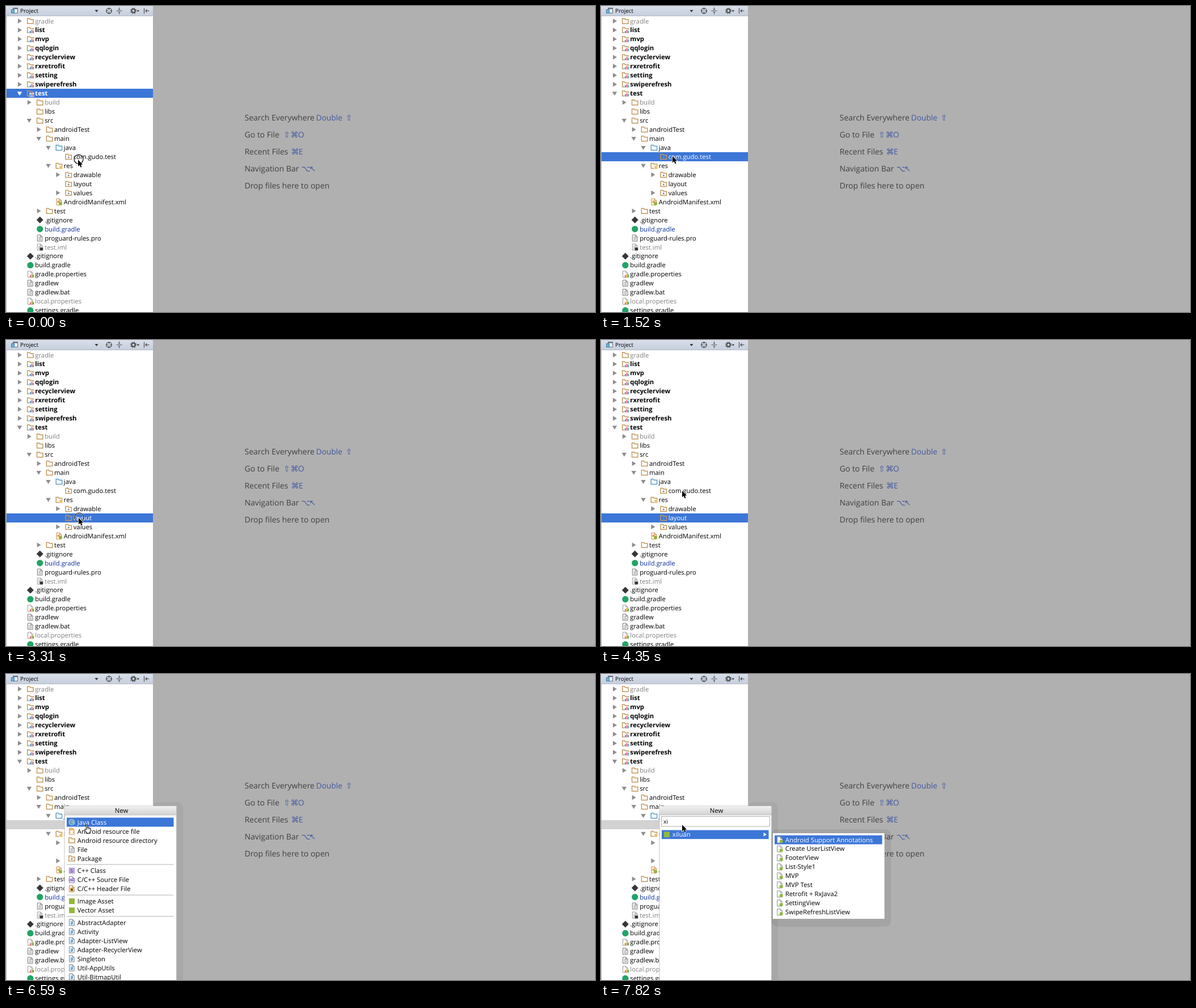
Write an HTML page that moves like this. It is 1038x540 px and loops after 8 s.

```html
<!DOCTYPE html>
<html lang="en">
<head>
<meta charset="utf-8">
<title>Project tree</title>
<style>
  html, body { margin: 0; width: 100%; height: 100%; overflow: hidden; background: #b0b0b0; }
  svg { display: block; width: 1038px; height: 540px; }
  text { font: 11.3px "Open Sans", "Noto Sans", sans-serif; text-rendering: geometricPrecision; white-space: pre; }
  .bold { font-weight: 700; }
  .hint { font-size: 13.95px; fill: #404040; }
  .key { font-size: 13.7px; fill: #4159a0; }
  .sym { font: 14px "DejaVu Sans", sans-serif; fill: #4159a0; }
</style>
</head>
<body>
<svg id="stage" viewBox="0 0 1038 540" xmlns="http://www.w3.org/2000/svg"></svg>
<script>
const LOOP = 8000;
const BLUE = '#3c76d7';
const TAN = '#c2995c';

const rect = (x, y, w, h, fill, more = '') =>
  `<rect x="${x}" y="${y}" width="${w}" height="${h}" fill="${fill}" ${more}/>`;
const path = (d, more) => `<path d="${d}" ${more}/>`;
const dot = (x, y, r, fill) => `<circle cx="${x}" cy="${y}" r="${r}" fill="${fill}"/>`;
const label = (x, y, s, more = '') => `<text x="${x}" y="${y}" ${more}>${s}</text>`;
const group = (id, body) => `<g id="${id}">${body}</g>`;

// Icons occupy a 12px box, vertically centred on zero.
const folder = (color = TAN) =>
  path('M.8 -4.4h3.9l1.3 1.8h5.2v7.2h-10.4z', `fill="none" stroke="${color}" stroke-width="1.5"`);
const sheet = (color = '#777') =>
  path('M1.6 -5.5h5.6l3 3v8h-8.6zM7 -5.3v3h3', `fill="#fff" stroke="${color}"`);
const lines = path('M3.5 -1.5h5M3.5 .8h5M3.5 3.1h5', 'stroke="#8a8a8a"');
const bars = (a, b, c) =>
  rect(5, 1.5, 2, 4, a) + rect(7.6, -.5, 2, 6, b) + rect(10.1, 1, 2, 4.5, c);

const icons = {
  folder: folder(),
  java: folder('#5b9fc9'),
  module: folder() + rect(4.5, -.8, 8, 7, '#fff') + bars('#5d8fc4', '#e06e6e', '#6b9ccc'),
  package: folder() + dot(6, 1.1, 1.5, '#7d8a99'),
  res: folder() + rect(6, 0, 6.5, 6, '#fff') + rect(6.8, .5, 5.2, 1.2, '#e8a21d') +
    rect(6.8, 2.3, 5.2, 1.2, '#e8a21d') + rect(6.8, 4.1, 5.2, 1.2, '#e8a21d'),
  file: sheet() + lines,
  manifest: sheet('#c78b3f') + rect(3, -2.2, 4.5, 4, '#e5a455') + dot(8.6, 2.8, 3.1, '#94b43c'),
  git: path('M6 -6L12 0L6 6L0 0Z', 'fill="#373737"'),
  gradle: dot(6, 0, 5.6, '#21a366'),
  props: sheet('#9a9a9a') + bars('#df6a58', '#e0aa32', '#57a64e'),
  iml: sheet('#999') + lines + rect(6, .8, 5.5, 5, '#333'),
  jclass: dot(6, 0, 5.7, '#8dbbd8') + label(2.7, 3.1, 'C', 'style="font-size:9px" fill="#345a73"'),
  xml: sheet('#c78b3f') + path('M4 0l-1.3 1.6l1.3 1.6M7.6 0l1.3 1.6l-1.3 1.6', 'fill="none" stroke="#d88430"') +
    rect(2.2, -4, 4.5, 2.4, '#e5a455'),
  cpp: rect(.7, -5.3, 10.6, 10.6, '#b6a3de') + label(3.6, 3, 'S', 'style="font-size:8px" fill="#5c3f9e"'),
  source: sheet('#8a76b8') + rect(.5, -2, 11, 5, '#9d83d2') +
    label(1.3, 2.2, 'C++', 'style="font-size:5.5px" fill="#fff"'),
  header: sheet('#b5833f') + rect(3, -2, 6, 6, '#dba04f') + rect(4.6, 0, 2.8, 4, '#5d4528'),
  robot: rect(1, -5, 10, 10, '#92b83a'),
  template: sheet('#737b84') + rect(3.3, -2.7, 5, 6.5, '#a9d2ee') +
    path('M6.5 -1.5v3.2q0 1.3 -2 1.2', 'fill="none" stroke="#2f76ad" stroke-width="1.2"'),
  recipe: sheet('#8d8d8d') + dot(8.6, 2.8, 3, '#92b83a')
};
const icon = (kind, x, y) => `<g transform="translate(${x} ${y})">${icons[kind]}</g>`;

// depth, arrow (> closed, v open, - none), icon, name, style (b bold, g grey, u blue)
const tree = `0 > folder gradle g|0 > module list b|0 > module mvp b|0 > module qqlogin b
0 > module recyclerview b|0 > module rxretrofit b|0 > module setting b|0 > module swiperefresh b
0 v module test b|1 > folder build g|1 - folder libs|1 v folder src|2 > folder androidTest
2 v folder main|3 v java java|4 - package com.gudo.test|3 v res res|4 > package drawable
4 - package layout|4 > package values|3 - manifest AndroidManifest.xml|2 > folder test
1 - git .gitignore|1 - gradle build.gradle u|1 - file proguard-rules.pro|1 - iml test.iml g
0 - git .gitignore|0 - gradle build.gradle|0 - props gradle.properties|0 - file gradlew
0 - file gradlew.bat|0 - props local.properties g|0 - gradle settings.gradle`
  .split(/[|\n]/).map(s => s.split(' '));

const rowY = i => 26.5 + 15.96 * i;
const inks = { g: '#808080', u: '#0a2f9c' };
const ink = i => inks[tree[i][4]] || '#000';

function treeRow([depth, arrow, kind, name, style], i) {
  const x = 24 + 16.85 * depth, y = rowY(i);
  const shape = { '>': 'M-3 -4.2L4 0L-3 4.2Z', 'v': 'M-4.2 -3H4.2L0 4Z' }[arrow];
  const mark = shape ? path(shape, `id="arrow${i}" transform="translate(${x} ${y})" fill="#8d8d8d"`) : '';
  return mark + icon(kind, x + 12.9, y) +
    label(x + 27.3, y + 4, name, `id="name${i}" fill="${ink(i)}" class="${style === 'b' ? 'bold' : ''}"`);
}

const head = rect(0, 0, 259, 18, 'url(#bar)') + rect(0, 17, 259, 1, '#b3b9c6') +
  rect(12.5, 3.5, 8, 9, '#eef3f8', 'stroke="#66717f"') + rect(12, 3, 9, 2.5, '#66717f') +
  rect(9.5, 6.5, 5, 6, '#6db4de', 'stroke="#3c7ba6"') +
  label(25, 12, 'Project', 'style="font-size:9.9px"') +
  path('M156.5 7h6l-3 4z', 'fill="#333"') +
  `<circle cx="181.5" cy="8.5" r="4.7" fill="none" stroke="#444" stroke-width="1.2"/>` +
  path('M181.5 3v4M181.5 10v4M176 8.5h4M183 8.5h4', 'stroke="#444" stroke-width="1.2"') +
  path('M194.5 8.5h10M199.5 2.5v4M199.5 14.5v-4M197.5 5l2 2l2 -2M197.5 12l2 -2l2 2', 'fill="none" stroke="#555"') +
  `<circle cx="224.5" cy="8.5" r="3" fill="none" stroke="#505050" stroke-width="2"/>` +
  `<circle cx="224.5" cy="8.5" r="4.7" fill="none" stroke="#505050" stroke-width="1.7" stroke-dasharray="1.85 1.84"/>` +
  path('M230.5 7.5h4.5l-2.2 3z', 'fill="#333"') +
  path('M243.5 3.5v10M252.5 8.5h-6M248.5 6l-2.5 2.5l2.5 2.5', 'fill="none" stroke="#505050" stroke-width="1.2"');

const hints = ['Search Everywhere', 'Go to File', 'Recent Files', 'Navigation Bar', 'Drop files here to open']
    .map((s, i) => label(420.5, 201.7 + 30.15 * i, s, 'class="hint"')).join('') +
  label(546.5, 201.7, 'Double', 'class="key"') + label(598.5, 201.7, '⇧', 'class="sym"') +
  label('489 501.5', 231.9, '⇧⌘', 'class="sym"') + label(514.8, 231.9, 'O', 'class="key"') +
  label(502.5, 262, '⌘', 'class="sym"') + label(515.8, 262, 'E', 'class="key"') +
  label('520.5 534.5', 292.2, '⌥↖', 'class="sym"');

const menuRow = (x, y, kind, s, fill = '#000') =>
  icon(kind, x, y) + label(x + 15.8, y + 4, s, `fill="${fill}"`);

// Menu blocks: first row centre, then icon/name pairs
const blocks = [
  [261.5, 'jclass Java Class', 'xml Android resource file', 'folder Android resource directory', 'file File', 'package Package'],
  [347, 'cpp C++ Class', 'source C/C++ Source File', 'header C/C++ Header File'],
  [401, 'robot Image Asset', 'robot Vector Asset'],
  [438.5, ...['AbstractAdapter', 'Activity', 'Adapter-ListView', 'Adapter-RecyclerView', 'Singleton',
    'Util-AppUtils', 'Util-BitmapUtil'].map(s => 'template ' + s)]
];
const menu = rect(107, 253.5, 188.5, 16, BLUE) +
  blocks.map(([y, ...items], b) => items.map((s, i) => {
    const cut = s.indexOf(' ');
    return menuRow(110, y + 16 * i, s.slice(0, cut), s.slice(cut + 1), b + i ? '#000' : '#fff');
  }).join('')).join('') +
  [336, 390, 427.5].map(y => rect(107, y - .5, 188, 1.3, '#c4c4c4')).join('');

const popup = rect(259, 226, 53, 330, '#000', 'rx="9" opacity=".045"') +
  rect(103, 233, 197.5, 320, '#fff', 'stroke="#b5b5b5" stroke-width=".8"') +
  rect(103.4, 233.4, 196.7, 15.6, 'url(#cap)') + rect(103, 248.5, 197.5, .8, '#bcbcbc') +
  label(203.5, 245, 'New', 'text-anchor="middle"');

const search = rect(106.5, 251.5, 191, 17.5, '#fff', 'stroke="#b0b0b0"') +
  label(110, 264, '', 'id="typed" style="font-size:10.3px"') +
  rect(107, 275.5, 188.5, 15.7, BLUE) + menuRow(110, 283.3, 'robot', 'xiluan', '#fff') +
  path('M286.5 279.8l5.5 3.5l-5.5 3.5z', 'fill="#fff"');

const choices = ['Android Support Annotations', 'Create UserListView', 'FooterView', 'List-Style1', 'MVP',
  'MVP Test', 'Retrofit + RxJava2', 'SettingView', 'SwipeRefreshListView'];
const submenu = rect(300, 274, 211, 172, '#000', 'rx="10" opacity=".07"') +
  rect(302.5, 280.5, 197.5, 152, '#fff', 'stroke="#a2a2a2" stroke-width=".9"') +
  rect(306, 284.7, 189.5, 15.8, BLUE) +
  choices.map((s, i) => menuRow(309, 292.5 + 15.95 * i, 'recipe', s, i ? '#000' : '#fff')).join('');

const pointers =
  group('ring', '<circle cx="1" cy="-1" r="8" fill="none" stroke="#fff" stroke-width="2.4" opacity=".75"/>' +
    '<circle cx="1" cy="-1" r="8" fill="none" stroke="#000" stroke-width="1.2"/>') +
  group('arrow', path('M0 0V11.6L2.7 9.1L4.6 13.4L6.5 12.6L4.7 8.4H8.3Z',
    'fill="#000" stroke="#fff" stroke-width="1.3" paint-order="stroke"')) +
  group('hand', path('M-1.6 7V1Q-1.6 -.4 -.5 -.4T.7 1V5Q2 4 2.8 5.4Q4 4.6 4.8 6Q6.2 5.6 6.2 7.4V10.5L4.9 13V15H-1.4V13L-4.4 9.2Q-5 7.6 -3.4 7.6L-1.6 9Z',
    'fill="#fff" stroke="#000"') + path('M.7 5v3M2.8 5.4v2.8M4.8 6v2.4', 'stroke="#000" stroke-width=".7"')) +
  group('beam', path('M-2.5 -6.5Q0 -6.5 0 -5V5Q0 6.5 -2.5 6.5M2.5 -6.5Q0 -6.5 0 -5M0 5Q0 6.5 2.5 6.5M-1.2 2.5H1.2',
    'fill="none" stroke="#333"'));

const fade = (id, a, b) => `<linearGradient id="${id}" x2="0" y2="1">` +
  `<stop stop-color="${a}"/><stop offset="1" stop-color="${b}"/></linearGradient>`;

document.getElementById('stage').innerHTML =
  `<defs>${fade('bar', '#d9dfea', '#c6cedc')}${fade('cap', '#f0f0f0', '#d2d2d2')}</defs>` +
  rect(0, 0, 1038, 540, '#b0b0b0') + hints +
  rect(0, 0, 259, 540, '#fff') + rect(0, 18, 1, 522, '#b4b4b4') + head +
  rect(1, 0, 258, 16, BLUE, 'id="pick"') + tree.map(treeRow).join('') +
  group('popup', popup + group('menu', menu) + group('search', search)) +
  group('submenu', submenu) + group('pointer', pointers);

const el = id => document.getElementById(id);
const show = (id, on) => el(id).setAttribute('display', on ? 'inline' : 'none');

// Each stop holds until the next: time, x, y
const track = [[0, 127, 271.3], [150, 127, 270], [330, 126, 265], [1810, 127, 302], [1960, 128, 314],
  [2110, 128, 316], [2410, 128, 314], [3900, 136, 297], [4050, 142, 283], [4200, 143, 269], [4350, 143, 266]];
const picks = [[0, 8], [620, 15], [2710, 18], [5850, 15]];
const presses = [[0, 150], [620, 770], [1220, 1520], [2710, 2860], [3310, 3600], [5850, 6000]];
const at = (list, t) => list.filter(s => s[0] <= t).pop();

function draw(t) {
  const [, x, y] = at(track, t);
  const picked = at(picks, t)[1];
  const open = t >= 6590, typing = t >= 7070, done = t >= 7820;

  el('pick').setAttribute('y', Math.round(rowY(picked) - 8));
  el('pick').setAttribute('fill', open ? '#d2d2d2' : BLUE);
  for (const [, i] of picks) {
    const on = i === picked && !open;
    el('name' + i).setAttribute('fill', on ? '#fff' : ink(i));
    if (el('arrow' + i)) el('arrow' + i).setAttribute('fill', on ? '#fff' : '#8d8d8d');
  }

  show('popup', open);
  show('menu', !typing);
  show('search', typing);
  show('submenu', done);
  el('typed').textContent = t < 7220 ? 'x' : 'xi';

  el('pointer').setAttribute('transform', `translate(${x} ${y})`);
  show('ring', presses.some(([a, b]) => t >= a && t < b));
  show('arrow', !open || done);
  show('hand', open && !typing);
  show('beam', typing && !done);
}

const start = performance.now();
function tick() {
  draw((performance.now() - start) % LOOP);
  requestAnimationFrame(tick);
}
tick();
</script>
</body>
</html>
```
